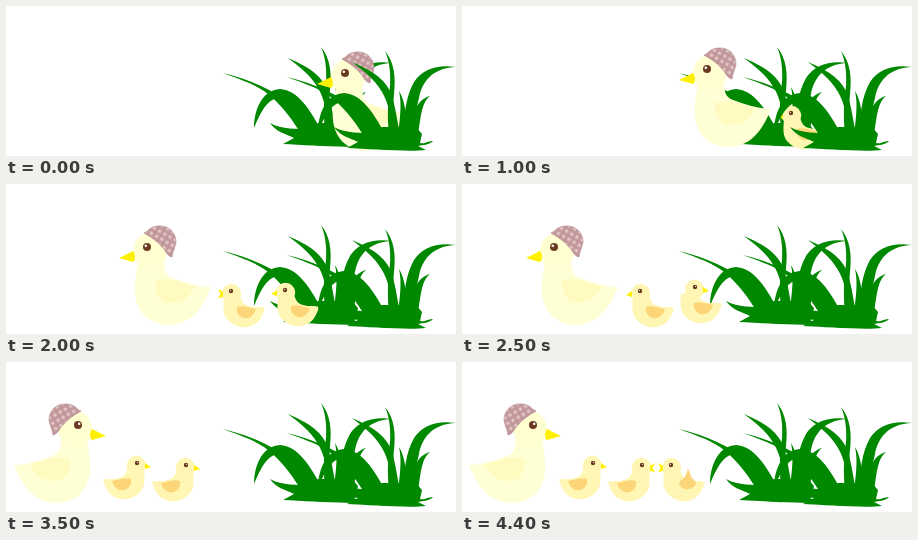
Animation of 450 by 150 pixels, one loop 4900 ms. Source, as an HTML page:

```html
<!DOCTYPE html>
<html lang="en">
<head>
<meta charset="utf-8">
<title>Duck family</title>
<style>
html, body { margin: 0; width: 100%; height: 100%; overflow: hidden; background: #fff; }
svg { display: block; width: 450px; height: 150px; }
</style>
</head>
<body>
<svg viewBox="0 0 450 150">
  <defs>
    <pattern id="plaid" width="6" height="6" patternUnits="userSpaceOnUse" patternTransform="rotate(30)">
      <rect width="6" height="6" fill="#d3b0b0"/>
      <path d="M0 1.5H6M1.5 0V6" stroke="#b88a90" stroke-width="2" opacity=".75"/>
      <path d="M4.5 3.5V5.5" stroke="#ead4d2" stroke-width="2"/>
    </pattern>

    <g id="grass" fill="#080">
      <path d="M217 67C245 74 268 84 284 98C300 112 312 128 316 140L300 138C292 120 275 97 258 85C246 77 230 72 217 67Z"/>
      <path d="M248 122C248 104 256 84 274 83C292 84 304 104 314 122L312 138C300 118 286 95 272 92C260 94 254 108 248 122Z"/>
      <path d="M282 52C300 60 316 68 322 86C326 100 328 115 330 125H322C322 108 318 92 312 82C304 68 292 60 282 52Z"/>
      <path d="M315 41C324 52 326 66 324 84C322 100 326 112 328 125H319C317 105 318 90 320 76C321 62 319 50 315 41Z"/>
      <path d="M386 57C362 58 352 72 349 88C346 100 344 112 343 125H333C334 104 336 86 344 72C352 59 368 54 386 57Z"/>
      <path d="M360 86C352 92 351 104 348 125H340C342 104 346 90 360 86Z"/>
      <path d="M329 81C336 92 336 108 338 125H328C330 108 332 94 329 81Z"/>
      <path d="M277 138L288 132C280 128 270 126 264 117C276 124 292 122 302 124L312 117H346L352 124L350 133C356 134 354 132 363 131C360 135 352 135 348 136L356 140C338 142 300 139 277 138Z"/>
    </g>

    <g id="mother-body">
      <path fill="#ffffd6" d="M-9 78C-11 90-13 100-12 110C-10 130 4 141 22 141C42 140 54 128 64 103C52 103 34 97 26 94C18 91 18 86 17 78Z"/>
      <path fill="#fffbc0" d="M8 97C20 92 34 99 48 102C44 114 32 120 22 119C12 118 7 108 8 97Z"/>
    </g>
    <g id="mother-head">
      <ellipse cx="3" cy="67" rx="17" ry="18" fill="#ffffd2"/>
      <circle cy="63" r="4" fill="#6b3a20"/>
      <circle cx="-1.2" cy="61.7" r="1.3" fill="#fff"/>
      <path fill="url(#plaid)" stroke="#b98f94" stroke-width=".7" d="M-3 49C2 47 2 43 11 42C22 41 29 49 29 58C28 64 26 66 25 73C20 72 19 67 15 63C10 57 4 53-3 49Z"/>
    </g>
    <path id="mother-closed" fill="#fff000" d="M-28 74L-14 67C-11 71-12 77-14 78Z"/>
    <path id="mother-open" fill="#fff000" d="M-28 64L-13 67L-13 75L-24 75L-19 70Z"/>

    <path id="chick-body" fill="#fff6b4" d="M-7 114C-8 124-8 130-4 135C2 142 10 144 16 143C26 142 31 134 34 124C30 122 24 124 18 122C11 120 11 116 9 112Z"/>
    <path id="wing-down" fill="#fbd578" d="M6 123C12 121 18 124 25 125C23 132 18 135 13 134C8 133 5 128 6 123Z"/>
    <path id="wing-up" fill="#fbd578" d="M8 124L14 119L17 111C20 115 19 118 21 120L25 124C25 129 20 132 14 131C10 130 8 127 8 124Z"/>
    <g id="chick-head">
      <circle cx=".5" cy="109.5" r="9.7" fill="#fff6b4"/>
      <circle cy="107" r="2.2" fill="#6b3a20"/>
      <circle cx="-.6" cy="106.3" r=".6" fill="#fff"/>
    </g>
    <path id="chick-closed" fill="#fff000" d="M-14 111L-8 107L-8 113Z"/>
    <path id="chick-open" fill="#fff000" d="M-13 105L-8 108L-8 113L-13 114L-10.5 110Z"/>
  </defs>
  <use href="#grass"/>
  <g id="birds"></g>
  <use href="#grass" x="64" y="4"/>
</svg>
<script>
const LOOP = 4900;
const TURN = 7;
const birds = document.getElementById("birds");

const part = (id, x, y, flip) =>
  `<use href="#${id}" transform="translate(${x} ${y}) scale(${flip ? -1 : 1} 1)"/>`;

// look: "left", "right", or "back" (body left, head turned right)
function place(kind, x, y, look, open, wing = "") {
  const flipBody = look === "right";
  const flipHead = look !== "left";
  const headX = look === "back" ? x + TURN : x;
  return part(kind + "-body", x, y, flipBody) +
    (wing && part(wing, x, y, flipBody)) +
    part(kind + "-head", headX, y, flipHead) +
    part(kind + (open ? "-open" : "-closed"), headX, y, flipHead);
}

const mother = (x, y = 0, look = "left", open = false) => place("mother", x, y, look, open);
const chick = (x, y = 0, look = "left", open = false, flap = false) =>
  place("chick", x, y, look, open, flap ? "wing-up" : "wing-down");

const first = chick(131, -6, "right");
const second = open => chick(180, -4, "right", open);

const scenes = [
  [0, mother(339, 4)],
  [500, mother(292, 2)],
  [1000, mother(245), chick(329)],
  [1500, mother(194), chick(277), chick(329)],
  [2000, mother(141), chick(225, 0, "left", true), chick(279, -1)],
  [2500, mother(92), chick(178), chick(226, -4, "back")],
  [3000, mother(34, 0, "back", true), chick(116, -6, "back"), chick(166, -6, "left", true, true)],
  [3500, mother(72, 0, "right"), first, second(false)],
  [4000, mother(72, 0, "right", true), first, second(true), chick(286, -3, "left", false, true)],
  [4200, mother(71, 0, "right"), first, second(true), chick(247, -4, "left", true, true)],
  [4400, mother(71, 0, "right"), first, second(true), chick(209, -4, "left", true, true)]
];

let shown = null;
function draw(time) {
  const t = time % LOOP;
  const scene = scenes.filter(([start]) => start <= t).pop();
  if (scene !== shown) {
    birds.innerHTML = scene.slice(1).join("");
    shown = scene;
  }
}

const begin = performance.now();
function tick() {
  draw(performance.now() - begin);
  requestAnimationFrame(tick);
}
tick();
</script>
</body>
</html>
```
